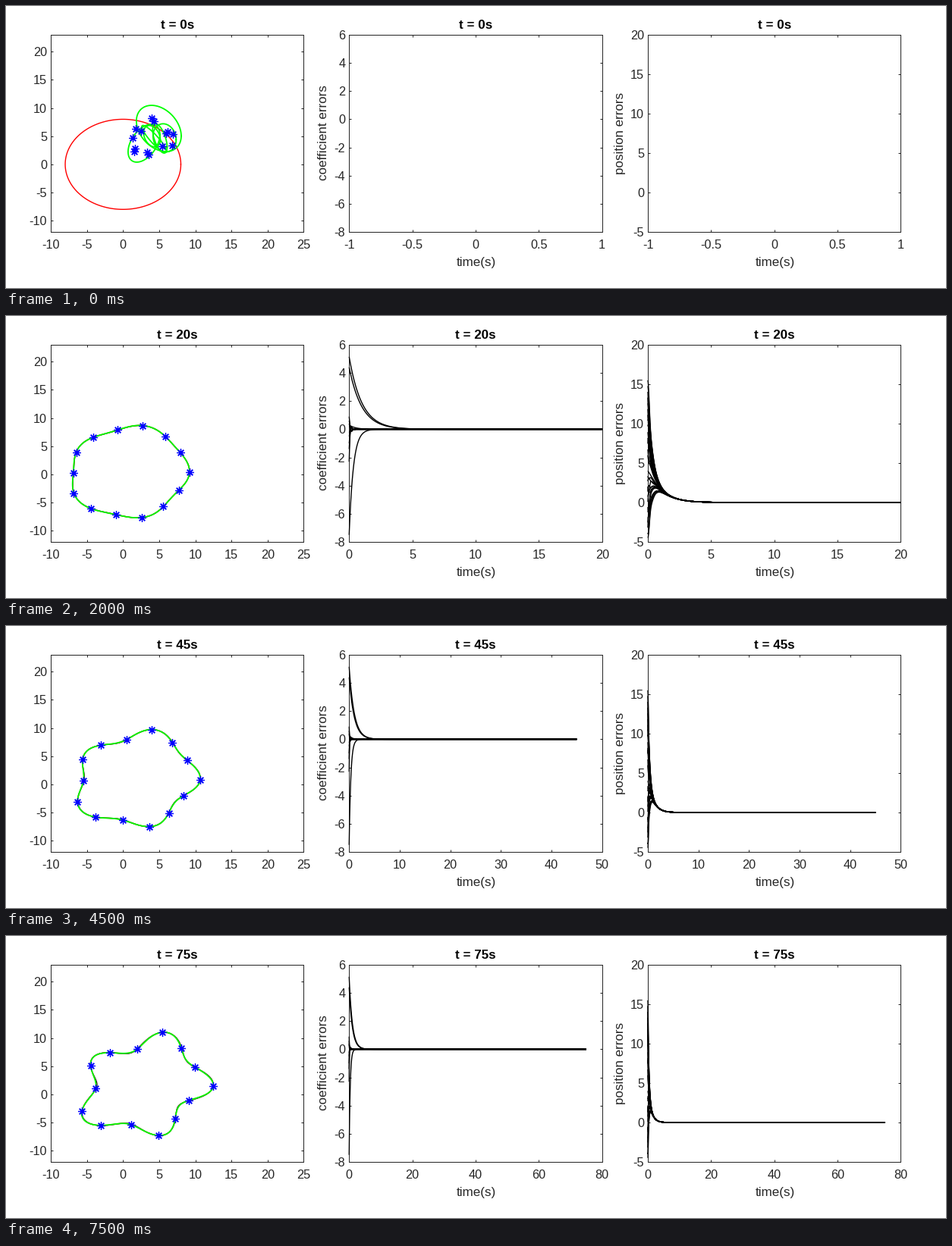
A matplotlib script that plays this animation: 1239x372 px, repeating every 8000 ms.

```python
import math
import numpy as np
import matplotlib.pyplot as plt
from matplotlib.animation import FuncAnimation

W, H, DPI = 1239, 372, 64
PX = 72 / DPI
FRAMES, STEP_MS, DT = 16, 500, 5
INK = "#262626"

plt.rcParams.update({
    "font.family": "Liberation Sans",
    "axes.linewidth": 1 * PX,
    "axes.edgecolor": INK,
    "path.simplify": False,
})
fig = plt.figure(figsize=(W / DPI, H / DPI), dpi=DPI, facecolor="white")


def label(x, y, text, **kw):
    style = dict(ha="center", va="baseline", fontsize=17 * PX, color=INK)
    return fig.text(x / W, 1 - y / H, text, **{**style, **kw})


def panel(left, ylim, yticks):
    ax = fig.add_axes([left / W, 1 - 298 / H, 333.4 / W, 260 / H])
    ax.set_ylim(*ylim)
    ax.set_yticks(yticks)
    ax.tick_params(direction="in", length=3 * PX, width=1 * PX, color=INK,
                   labelcolor=INK, labelsize=16.3 * PX, top=True, right=True)
    ax.tick_params(axis="x", pad=10 * PX)
    ax.tick_params(axis="y", pad=5 * PX)
    ax.yaxis.set_major_formatter(lambda v, _: f"{v:g}")
    ax.xaxis.set_major_formatter(lambda v, _: f"{v:g}")
    title = label(left + 167, 30.5, "", weight="bold", color="black")
    return ax, title


ax1, title1 = panel(59, (-12, 23), range(-10, 21, 5))
ax2, title2 = panel(452.3, (-8, 6), range(-8, 7, 2))
ax3, title3 = panel(846, (-5, 20), range(-5, 21, 5))
ax1.set_xlim(-10, 25)
ax1.set_xticks(range(-10, 26, 5))
for left in (452.3, 846):
    label(left + 167.5, 343.5, "time(s)")
for x, name in ((426, "coefficient errors"), (817, "position errors")):
    label(x, 167.5, name, rotation=90, ha="right", va="center")

# Formation: agents drift linearly from a circle to a star.
N = 14
theta = 2 * np.pi * np.arange(N) / N
phi = np.linspace(0, 2 * np.pi, 401)
drift = np.array([
    4.47 + 1.41j, 2.74 + 1.36j, 3.07 + 1.94j, 3.60 + 3.22j, 3.76 + .26j,
    3.18 + 1.13j, 2.73 + 1.69j, 4.20 + 1.06j, 1.52 + .52j, 1.92 + .75j,
    2.86 + 2.43j, 3.13 + .48j, 2.23 + 1.96j, 1.90 + 2.40j]) / 75
freq = np.fft.fftfreq(N, 1 / N)
basis = np.exp(1j * np.outer(phi, freq))
basis[:, N // 2] = np.cos(N // 2 * phi)
curve_drift = basis @ (np.fft.fft(drift) / N)

start = np.array([
    3.96 + 8.2j, 4.3 + 7.6j, 1.77 + 6.3j, 2.5 + 5.9j, 1.35 + 4.7j,
    1.65 + 2.8j, 1.56 + 2.3j, 3.35 + 2.15j, 3.56 + 1.75j, 5.45 + 3.2j,
    6.8 + 3.35j, 6.9 + 5.4j, 5.95 + 5.55j, 6.2 + 5.8j])

# Centre, half width and height, and phase of each first guess.
guesses = [
    (4.95, 6.37, 3.10, 4.10, 1.9), (2.90, 3.75, 2.20, 3.36, 1.1),
    (5.10, 4.60, 1.00, 2.60, 2.2), (4.30, 4.50, 1.70, 2.40, 2.7),
    (5.75, 4.70, 1.60, 2.50, 1.7), (4.00, 5.00, 1.15, 1.90, 1.9)]

wanted, = ax1.plot([], [], color="black", lw=1.3 * PX)
rough, = ax1.plot([], [], color="red", lw=1.4 * PX)
loops = [ax1.plot([], [], color="lime", lw=1.8 * PX)[0] for _ in guesses]
agents, = ax1.plot([], [], ls="none", marker=(8, 2, 0), ms=10.5 * PX,
                   mec="blue", mew=1.3 * PX)


def put(line, z):
    line.set_data(z.real, z.imag)


def draw_formation(t):
    circle = 8 * np.exp(1j * phi)
    fit = circle + t * curve_drift
    radius = 8 + t * (.02 * np.cos(5 * phi) + .01 * np.sin(2 * phi))
    polar = (.04 + .02j) * t + radius * np.exp(1j * phi)
    put(wanted, (fit + polar) / 2)
    put(rough, .9 * fit + .1 * polar)
    wanted.set_visible(t > 0)
    put(agents, 8 * np.exp(1j * theta) + t * drift if t else start)
    for i, (line, (cx, cy, rx, ry, lag)) in enumerate(zip(loops, guesses)):
        if t:
            put(line, fit)
        else:
            line.set_data(cx + rx * np.cos(phi), cy + ry * np.cos(phi + lag))
        line.set_visible(t == 0 or i == 0)


# Decaying errors: (start, rate) for coefficients, mixed modes for positions.
rng = np.random.default_rng(4)
coef = [(5.15, 1), (4.4, 1), (-7.5, 3), (.3, 2), (.9, 9), (.6, 7), (-2.3, 14),
        (-1.4, 12), (-1, 10), (-.5, 8), (.4, 11), (-.25, 5)]
firsts = np.concatenate([np.linspace(6, 15.5, 14), np.linspace(-4.5, 4, 14)])
shares = rng.uniform(4.5, 4.9, 28)
rates = rng.uniform(2.8, 3.4, 28)
wiggles = rng.uniform(-2.5, 2.5, 28)


def error_lines(ax, count):
    # Drawn over the frame so the steep starts stay visible on the axis.
    return [ax.plot([], [], color="black", lw=1.4 * PX, zorder=4,
                    clip_on=False, solid_capstyle="butt")[0]
            for _ in range(count)]


coef_lines = error_lines(ax2, len(coef))
pos_lines = error_lines(ax3, len(firsts))


def draw_errors(t):
    s = t * np.linspace(0, 1, 800) ** 3
    for line, (a, k) in zip(coef_lines, coef):
        ring = np.cos(14 * s) if k > 4 else 1
        line.set_data(s, a * np.exp(-k * s) * ring)
    for line, a, c, k, w in zip(pos_lines, firsts, shares, rates, wiggles):
        y = c * np.exp(-s) + (a - c) * np.exp(-k * s)
        line.set_data(s, y + w * np.exp(-9 * s) * np.sin(16 * s))
    for line in coef_lines + pos_lines:
        line.set_visible(t > 0)


def time_axis(t):
    if t == 0:
        return np.linspace(-1, 1, 5)
    step = next(v for v in (1, 2, 5, 10, 20) if t / v <= 6)
    return np.arange(math.ceil(t / step) + 1) * step


def update(i):
    t = i * DT
    for title in (title1, title2, title3):
        title.set_text(f"t = {t}s")
    ticks = time_axis(t)
    for ax in (ax2, ax3):
        ax.set_xticks(ticks)
        ax.set_xlim(ticks[0], ticks[-1])
    draw_formation(t)
    draw_errors(t)
    return []


anim = FuncAnimation(fig, update, frames=FRAMES, interval=STEP_MS,
                     init_func=lambda: [], repeat=True, repeat_delay=0)
plt.show()
```
